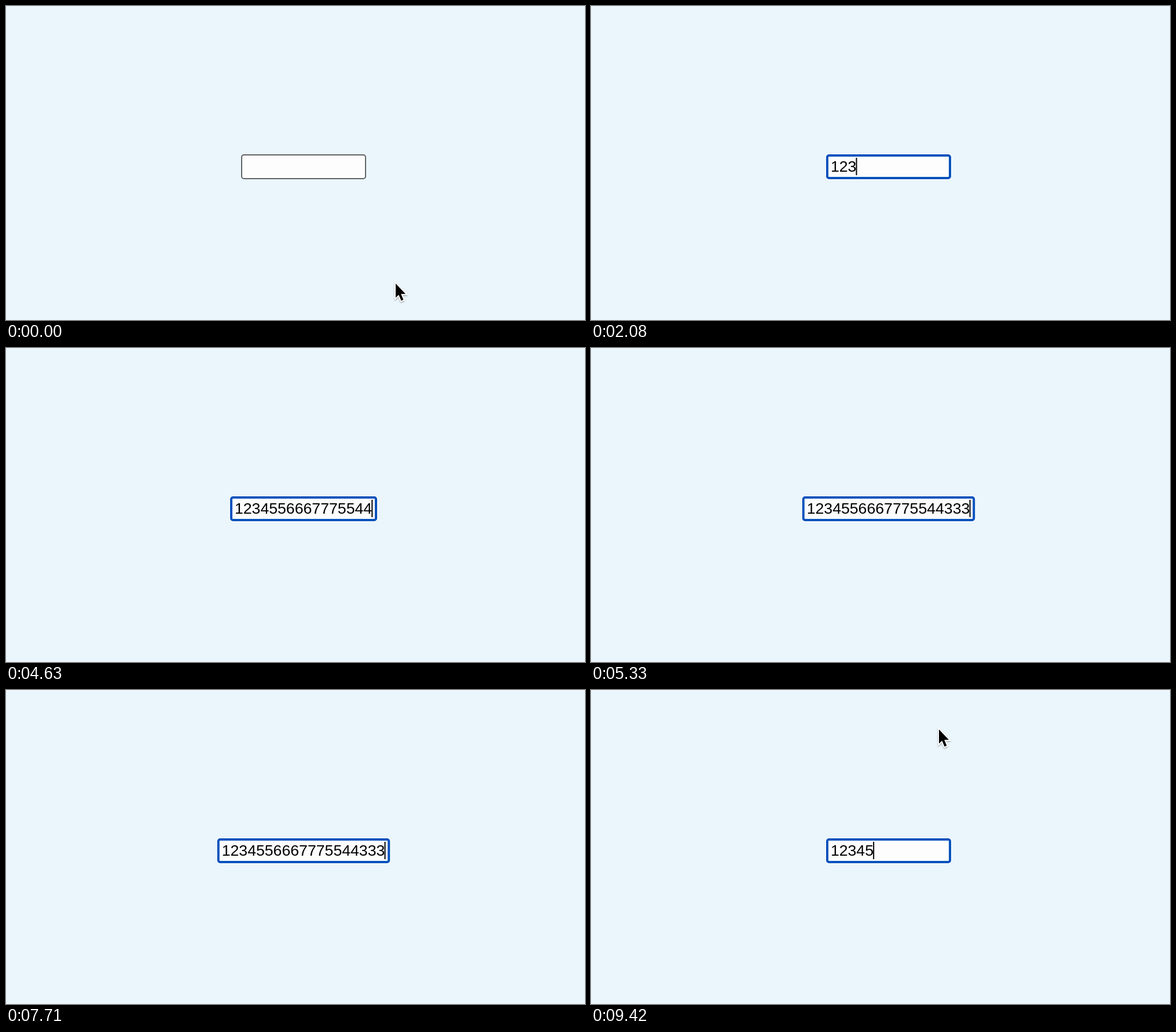
Animation, 1000 px wide and 542 px high, one loop 9460 ms. Source, as an HTML page:

```html
<!DOCTYPE html>
<html lang="en">
<head>
<meta charset="utf-8">
<title>Growing number field</title>
<style>
  html, body { margin: 0; width: 100%; height: 100%; overflow: hidden; background: #eaf5fc; }
  svg { display: block; width: 100%; height: 100%; }
  text { font: 26.667px "Liberation Sans", Arial, sans-serif; fill: #000; }
</style>
</head>
<body>
<svg viewBox="0 0 1000 542">
  <defs>
    <filter id="shadow" x="-50%" y="-50%" width="200%" height="200%">
      <feDropShadow dx="0" dy="1.5" stdDeviation="1.2" flood-opacity=".35"/>
    </filter>
  </defs>
  <rect id="halo" y="254.5" height="46" rx="6" fill="#fff" fill-opacity=".75"/>
  <rect id="box" fill="#fdfdfd"/>
  <text id="digits" y="286"></text>
  <rect id="caret" y="262" width="2" height="30"/>
  <g id="arrow" filter="url(#shadow)">
    <path d="M1 2V26.5L6.3 21.5L10.6 31.7L14.4 30.1L10.2 20H18Z" fill="#000" stroke="#fff" stroke-width="3.6" paint-order="stroke"/>
  </g>
  <g id="beam" fill="none">
    <path d="M-5-15Q0-15 0-11V11Q0 15-5 15M5-15Q0-15 0-11M0 11Q0 15 5 15M-3 5H3" stroke="#fff" stroke-width="4"/>
    <path d="M-5-15Q0-15 0-11V11Q0 15-5 15M5-15Q0-15 0-11M0 11Q0 15 5 15M-3 5H3" stroke="#000" stroke-width="1.8"/>
  </g>
</svg>
<script>
const LOOP = 9460, CENTER = 514, MIN_WIDTH = 216, DIGIT = 14.83, BLINK = 500;
const VALUE = "12345566677755443334456";
const FOCUS = 790;
const typed = [1090, 1370, 1800, 2120, 2300, 2460, 2640, 2800, 2960, 3120, 3300, 3580,
  3670, 3960, 4220, 4460, 4720, 4950, 5160, 5380, 5620, 5860, 6220];
// one press of backspace, then key repeat
const erased = [7040, ...Array.from({ length: 17 }, (_, i) => 7530 + i * 88)];
const moves = [
  { start: 250, end: 630, from: [672, 477], bend: [560, 385], to: [500, 294] },
  { start: 9050, end: 9390, from: [500, 294], bend: [565, 190], to: [600, 66] }
];

const el = id => document.getElementById(id);
const set = (id, attrs) => {
  for (const key in attrs) el(id).setAttribute(key, attrs[key]);
};
const show = (id, on) => set(id, { visibility: on ? "visible" : "hidden" });
const past = (times, t) => times.filter(time => time <= t);
const smooth = p => p * p * (3 - 2 * p);

function pointerAt(t) {
  const { start, end, from, bend, to } = moves[t < moves[1].start ? 0 : 1];
  const p = smooth(Math.min(1, Math.max(0, (t - start) / (end - start))));
  return from.map((a, i) => (1 - p) ** 2 * a + 2 * p * (1 - p) * bend[i] + p * p * to[i]);
}

function drawField(t) {
  const count = past(typed, t).length - past(erased, t).length;
  const width = Math.max(MIN_WIDTH, count * DIGIT + 16.7);
  const left = CENTER - width / 2;
  const focused = t >= FOCUS;
  const line = focused ? 4 : 2;
  set("halo", { x: left - 1.5, width: width + 3 });
  show("halo", focused);
  set("box", {
    x: left + line / 2, y: 256 + line / 2, width: width - line, height: 43 - line,
    rx: focused ? 3 : 4, stroke: focused ? "#0452bd" : "#606264", "stroke-width": line
  });
  set("digits", { x: left + 7.9 });
  el("digits").textContent = VALUE.slice(0, count);

  const lastKey = Math.max(FOCUS, ...past(typed, t), ...past(erased, t));
  set("caret", { x: left + 7 + count * DIGIT });
  show("caret", focused && Math.floor((t - lastKey) / BLINK) % 2 === 0);
}

function drawPointer(t) {
  const [x, y] = pointerAt(t);
  const hidden = t >= typed[0] && t < moves[1].start;
  const inside = Math.abs(x - CENTER) < MIN_WIDTH / 2 && y > 256 && y < 299;
  for (const id of ["arrow", "beam"]) set(id, { transform: `translate(${x} ${y})` });
  show("arrow", !hidden && !inside);
  show("beam", !hidden && inside);
}

function draw(t) {
  drawField(t);
  drawPointer(t);
}

const began = performance.now();
function tick(now) {
  draw(Math.max(0, now - began) % LOOP);
  requestAnimationFrame(tick);
}
draw(0);
requestAnimationFrame(tick);
</script>
</body>
</html>
```
